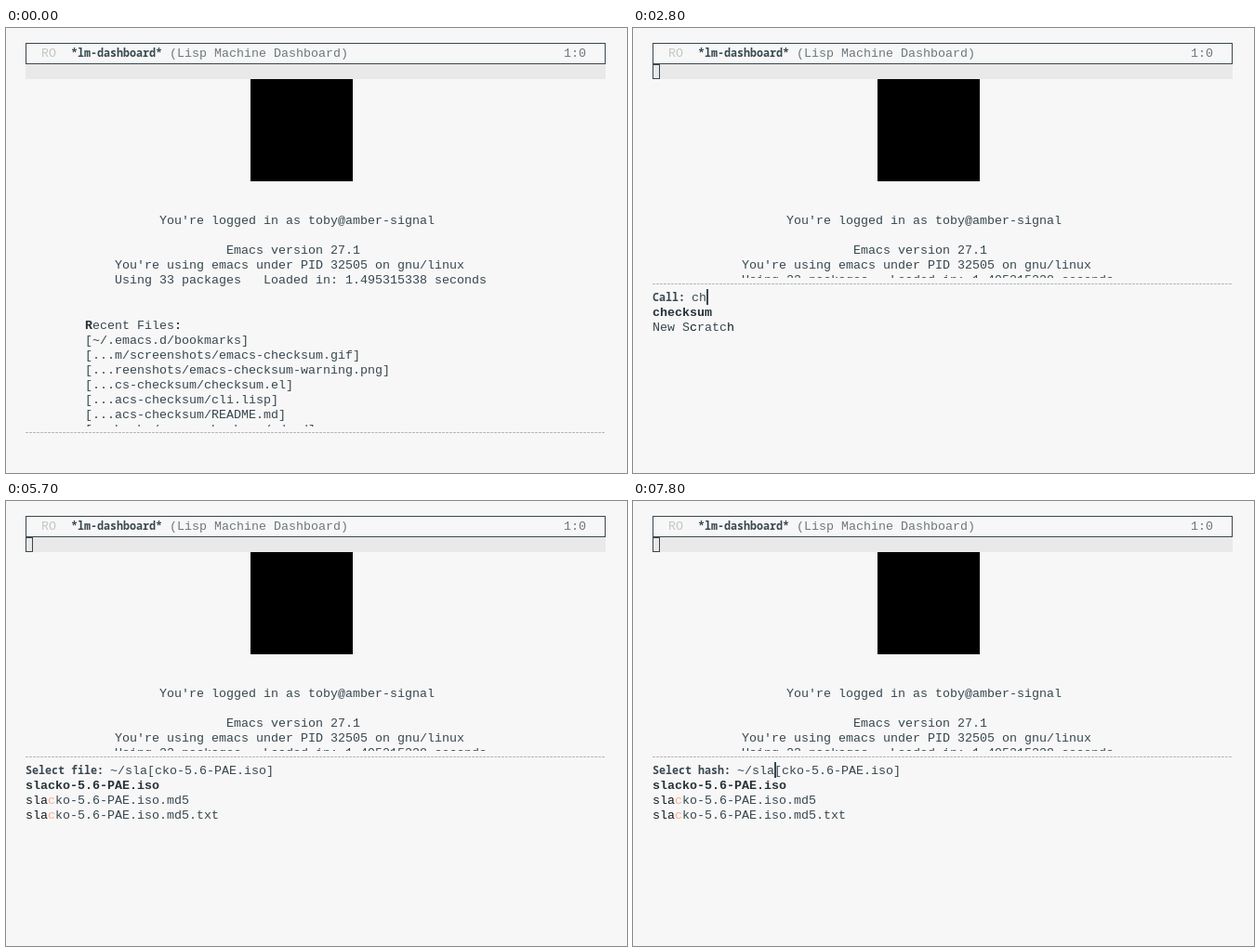
An HTML page with a canvas for the animation above (8 s loop, 668 by 479 pixels).

```html
<!DOCTYPE html>
<html lang="en">
<head>
<meta charset="utf-8">
<title>Checksum prompt</title>
<style>
  html, body { margin: 0; width: 668px; height: 479px; overflow: hidden; background: #f7f7f7; }
  canvas { display: block; }
</style>
</head>
<body>
<canvas id="stage" width="668" height="479"></canvas>
<script>
const ctx = document.getElementById('stage').getContext('2d');
const LOOP = 8000;
const CELL = 8, LEFT = 21, RIGHT = 645, ROW = 16;
const INK = '#37474f', STRONG = '#263238', FADED = '#b9bebf', POP = '#ffab91', BG = '#f7f7f7';
const MONO = '"Liberation Mono", "Noto Sans Mono", monospace';
const BODY = '13.333px ' + MONO;
const BOLD = 'bold 13.333px ' + MONO;
const LABEL = '600 11.667px "Noto Sans Mono", "Liberation Mono", monospace';

const dashboard = [
  [165, 211, "You're logged in as toby@amber-signal"],
  [237, 243, 'Emacs version 27.1'],
  [117, 259, "You're using emacs under PID 32505 on gnu/linux"],
  [117, 275, 'Using 33 packages   Loaded in: 1.495315338 seconds'],
  [93, 324, 'ecent Files'],
  ...[
    '[~/.emacs.d/bookmarks]',
    '[...m/screenshots/emacs-checksum.gif]',
    '[...reenshots/emacs-checksum-warning.png]',
    '[...cs-checksum/checksum.el]',
    '[...acs-checksum/cli.lisp]',
    '[...acs-checksum/README.md]',
    '[...hacks/emacs-checksum/md.md]'
  ].map((name, i) => [85, 340 + i * ROW, name])
];

const commands = ['checksum', 'New Scratch', 'Recent Files', 'Find File', 'Bookmarks',
  'Mail', 'Shell', 'Packages', 'Help', 'Quit'];
const home = ['./', 'win/', '.ssh/', 'News/', 'RMAIL', 'mail/', '.dmrc', '.pki/', '.vnc/', 'Music/'];
const isos = ['', '.md5', '.md5.txt'].map(end => 'slacko-5.6-PAE.iso' + end);
const withS = [...isos, '.ssh/', 'News/', 'Music/'];

// Prompt states: start, label, typed text, hint, candidates, characters matched.
const call = (at, typed, hint, list) => ({ at, label: 'Call: ', typed, hint, list, query: typed });
const pick = (at, what, query, hint, list) =>
  ({ at, label: 'Select ' + what + ': ', typed: '~/' + query, hint, list, query });
const prompts = [
  call(1900, '', '', commands),
  call(2800, 'ch', '', ['checksum', 'New Scratch']),
  call(2900, 'che', '[cksum] [Matched]', []),
  pick(3900, 'file', '', '', []),
  pick(4200, 'file', '', '', home),
  pick(5100, 'file', 'sl', '[acko-5.6-PAE.iso]', isos),
  pick(5200, 'file', 'sla', '[cko-5.6-PAE.iso]', isos),
  pick(6400, 'file', isos[0], '', isos),
  pick(6500, 'hash', '', '', []),
  pick(6700, 'hash', '', '', home),
  pick(7600, 'hash', 's', '', withS),
  pick(7700, 'hash', 'sl', '[acko-5.6-PAE.iso]', isos),
  pick(7800, 'hash', 'sla', '[cko-5.6-PAE.iso]', isos)
];

// Spans in which the text cursor is blinked off.
const hidden = [[0, 400], [900, 1400], [2400, 2800], [3500, 3900],
  [4700, 5100], [5700, 6200], [7300, 7600]];

function text(str, x, y, color = INK, font = BODY) {
  ctx.font = font;
  ctx.fillStyle = color;
  ctx.fillText(str, x, y);
}

function rect(x, y, w, h, color) {
  ctx.fillStyle = color;
  ctx.fillRect(x, y, w, h);
}

function frame(x, y, w, h) {
  ctx.strokeStyle = INK;
  ctx.lineWidth = 1;
  ctx.strokeRect(x + 0.5, y + 0.5, w - 1, h - 1);
}

function header() {
  frame(LEFT, 16, RIGHT - LEFT, 23);
  text('RO', 38, 31, '#c3c8c4');
  text('*lm-dashboard*', 70, 31, INK, LABEL);
  text('(Lisp Machine Dashboard)', 176, 31, '#6b777d');
  text('1:0', 600, 31, '#6b777d');
  rect(LEFT, 39, RIGHT - LEFT, 16, '#e9e9e9');
}

function page(split) {
  ctx.save();
  ctx.beginPath();
  ctx.rect(0, 55, 668, split - 6 - 55);
  ctx.clip();
  rect(263, 55, 110, 110, '#000');
  for (const [x, y, str] of dashboard) text(str, x, y);
  text('R', 85, 324, STRONG, BOLD);
  text(':', 181, 324, STRONG, BOLD);
  ctx.restore();
  for (let x = LEFT; x < RIGHT; x += 4) rect(x, split, 3, 1, '#b8b8b8');
}

function candidate(name, y, query) {
  let next = 0, pop = query ? -1 : 0;
  [...name].forEach((ch, i) => {
    let color = INK;
    if (next < query.length && ch === query[next]) {
      color = '#111a1e';
      if (++next === query.length && name.startsWith(query)) pop = i + 1;
    } else if (i === pop) {
      color = POP;
    }
    text(ch, LEFT + i * CELL, y, color);
  });
}

function prompt({ label, typed, hint, list, query }, cursorOn) {
  const x = LEFT + label.length * 7;
  const end = x + typed.length * CELL;
  text(label, LEFT, 294, INK, LABEL);
  text(typed + hint, x, 294);
  if (cursorOn) rect(end, 281, 2, 17, INK);
  list.forEach((name, i) => {
    const y = 310 + i * ROW;
    if (i) candidate(name, y, query);
    else text(name, LEFT, y, STRONG, BOLD);
  });
}

function draw(t) {
  const open = prompts.filter(p => p.at <= t).pop();
  const cursorOn = !hidden.some(([from, to]) => t >= from && t < to);
  rect(0, 0, 668, 479, BG);
  header();
  page(open ? 275 : 435);
  if (open) {
    frame(LEFT, 39, CELL, 16);
    prompt(open, cursorOn);
  } else {
    if (cursorOn) rect(LEFT, 39, CELL, 16, INK);
    if (t >= 1800) text('C-x C-x', LEFT, 453, FADED);
  }
}

const start = performance.now();
function tick() {
  draw((performance.now() - start) % LOOP);
  requestAnimationFrame(tick);
}
tick();
</script>
</body>
</html>
```
